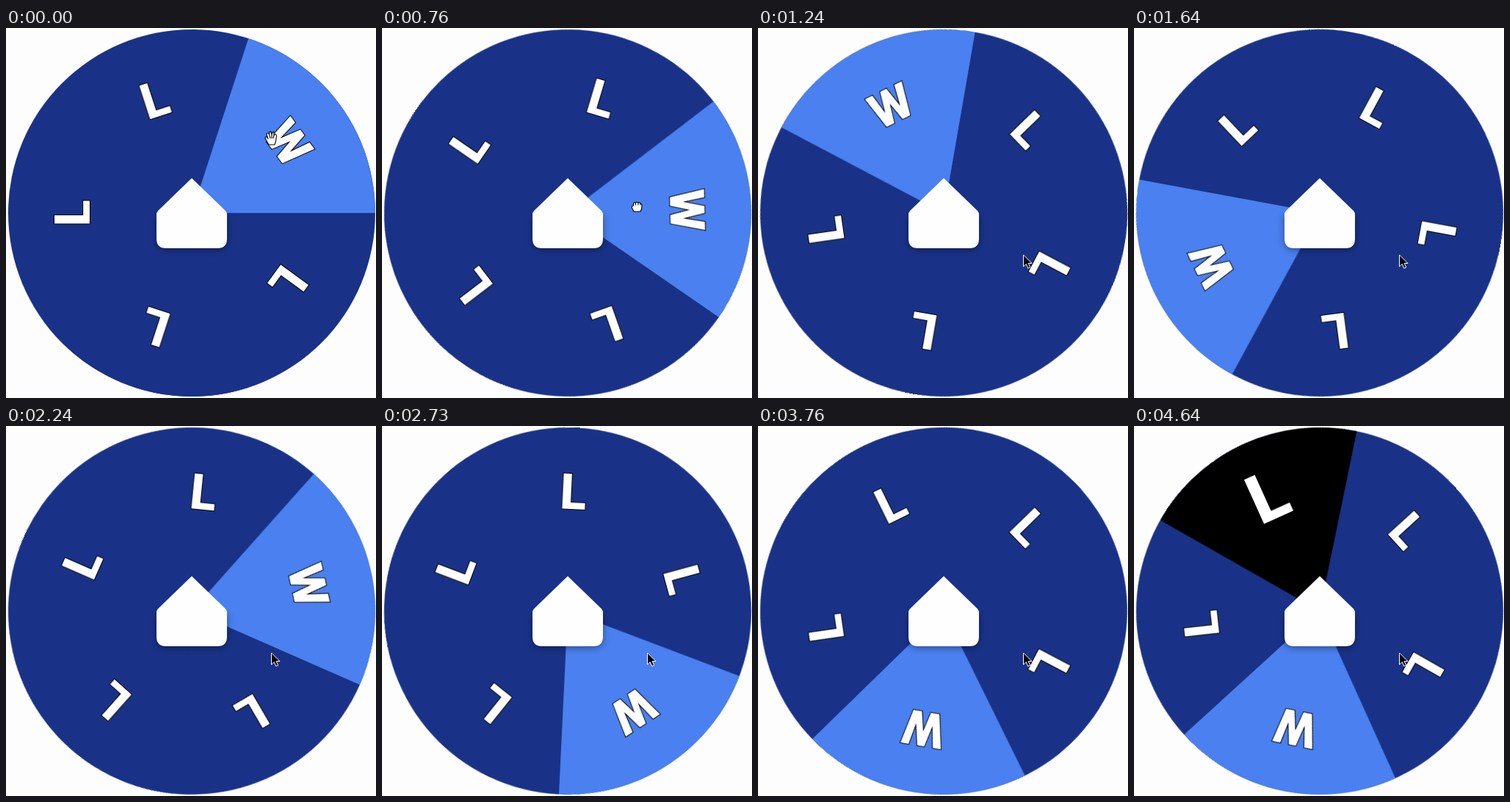
Write an HTML page without scripts that moves like this. It is 504 by 504 pixels and loops after 4670 ms.

```html
<!DOCTYPE html>
<html lang="en">
<head>
<meta charset="utf-8">
<title>Spin wheel</title>
<style>
  html, body { margin: 0; width: 100%; height: 100%; overflow: hidden; background: #fdfdfd; }
  svg { display: block; width: 100vw; height: 100vh; }
  svg * { animation-duration: 4670ms; animation-iteration-count: infinite; }

  .label {
    font: 800 66px Roboto, sans-serif;
    text-anchor: middle;
    fill: #fff;
    stroke: #000;
    stroke-width: 2px;
    paint-order: stroke;
  }
  .pointer { fill: #fefefe; }
  .base { filter: drop-shadow(0 2px 5px rgba(0, 0, 0, .4)); }
  .glove { fill: #fff; stroke: #000; stroke-width: 1.1; stroke-linejoin: round; stroke-linecap: round; }

  .wheel { animation-name: spin; }
  .hit { fill: #193287; animation-name: darken; }
  .grow { animation-name: grow; }
  .cursor { animation-name: move; }
  .open { animation-name: open; animation-timing-function: step-end; }
  .fist { animation-name: fist; animation-timing-function: step-end; }
  .arrow { animation-name: arrow; animation-timing-function: step-end; }

  /* Drag, release, then friction brings the wheel to rest. */
  @keyframes spin {
    0% { transform: rotate(0deg); }
    12.2% { transform: rotate(0deg); animation-timing-function: cubic-bezier(.33, .1, .67, .74); }
    16.274% { transform: rotate(34.5deg); animation-timing-function: cubic-bezier(.33, .25, .8, .5); }
    22.27% { transform: rotate(67deg); animation-timing-function: cubic-bezier(.333, .387, .667, .715); }
    26.552% { transform: rotate(278.9deg); animation-timing-function: cubic-bezier(.333, .447, .667, .757); }
    35.118% { transform: rotate(550deg); animation-timing-function: cubic-bezier(.333, .511, .667, .795); }
    47.966% { transform: rotate(743.5deg); animation-timing-function: cubic-bezier(.333, .65, .667, .86); }
    69.379% { transform: rotate(844.9deg); animation-timing-function: cubic-bezier(.2, .82, .45, 1); }
    95.93%, 100% { transform: rotate(857.65deg); }
  }
  @keyframes darken {
    0%, 96.36% { fill: #193287; }
    99.14%, 100% { fill: #000; }
  }
  @keyframes grow {
    0%, 96.36% { transform: scale(1); }
    99.14%, 100% { transform: scale(1.41); }
  }
  @keyframes move {
    0% { transform: translate(361px, 150px); animation-timing-function: ease-in-out; }
    4.3% { transform: translate(214px, 16px); animation-timing-function: ease-in-out; }
    9% { transform: translate(417px, 90px); animation-timing-function: ease-in-out; }
    12.2% { transform: translate(372px, 151px); animation-timing-function: linear; }
    16.274% { transform: translate(347px, 243px); animation-timing-function: ease-in; }
    22.27%, 100% { transform: translate(361px, 309px); }
  }
  @keyframes open { 0% { opacity: 1; } 12%, 100% { opacity: 0; } }
  @keyframes fist { 0% { opacity: 0; } 12% { opacity: 1; } 22.27%, 100% { opacity: 0; } }
  @keyframes arrow { 0% { opacity: 0; } 22.27%, 100% { opacity: 1; } }
</style>
</head>
<body>
<svg viewBox="0 0 504 504">
  <defs>
    <path id="slice" d="M0 0L-146.95-202.25A250 250 0 0 1 146.95-202.25Z"/>
    <text id="lose" class="label">L</text>
  </defs>

  <g transform="translate(253 252)">
    <g class="wheel">
      <circle r="250" fill="#193287"/>
      <g transform="rotate(54)">
        <use href="#slice" fill="#4a80ef"/>
        <text class="label" y="-139.500">W</text>
      </g>
      <g transform="rotate(126)"><use href="#lose" y="-139.500"/></g>
      <g transform="rotate(198)">
        <use href="#slice" class="hit"/>
        <g transform="translate(0 -139.500)"><g class="grow"><use href="#lose"/></g></g>
      </g>
      <g transform="rotate(270)"><use href="#lose" y="-139.500"/></g>
      <g transform="rotate(342)"><use href="#lose" y="-139.500"/></g>
    </g>
  </g>

  <g class="pointer">
    <path class="base" d="M205 254H301V287Q301 300 288 300H218Q205 300 205 287Z"/>
    <path d="M253 204.500L299 249Q301 251 301 255H205Q205 251 207 249Z"/>
  </g>

  <g class="cursor">
    <g class="open glove">
      <path d="M-3 9L-7 2Q-9-1-7-1.500T-4 1L-6-5Q-6-7-4.500-7T-2.500-5L-2-8Q-1-9.500 0-8.500L1-5 2-8Q3.500-9 4-7.500V-4Q5-6 6.500-5T7 0Q7 4 5 9Z"/>
      <path d="M-2.500-5L-1 0M1-5V0M4-4L3 0" fill="none"/>
    </g>
    <g class="fist glove">
      <path d="M-4 7L-6.500 2Q-7-1-4.500-1V-4Q-3.500-6-1.500-5 0-6.500 2-5 4-6 5-4 7-4 7-1 7 4 5 7Z"/>
      <path d="M-1.500-5V-2M2-5V-2M5-4V-2" fill="none"/>
    </g>
    <path class="arrow" d="M.5 0V16L4.300 12.500 6.800 18.300 9.700 17 7.200 11.500H12Z" fill="#000" stroke="#fff"/>
  </g>
</svg>
</body>
</html>
```
